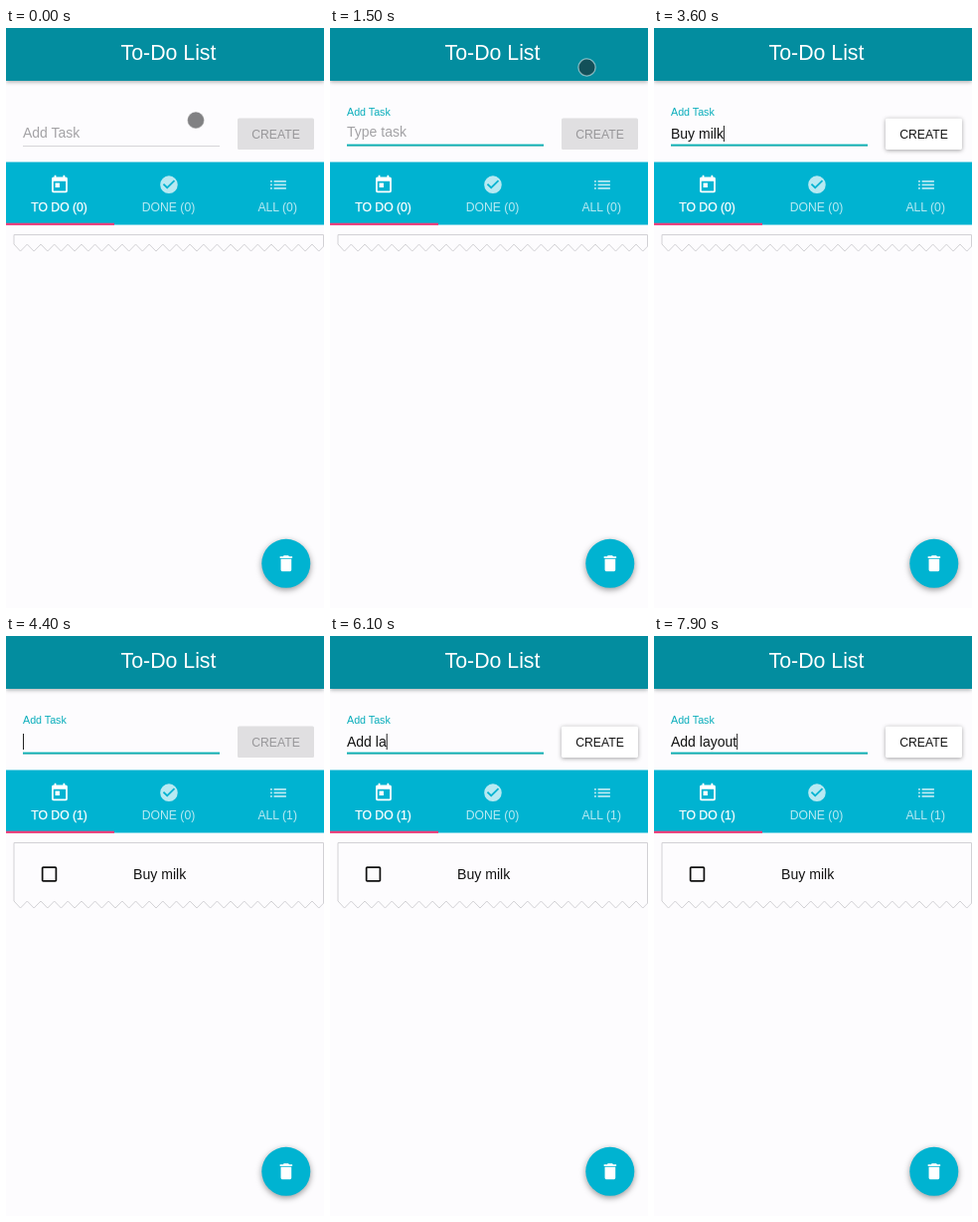
An HTML page that plays this animation: 320 px wide and 582 px high, repeating every 8 s.

```html
<!DOCTYPE html>
<html lang="en">
<head>
<meta charset="utf-8">
<title>To-Do List</title>
<style>
html, body { margin: 0; width: 100%; height: 100%; overflow: hidden; background: #fdfcfe; }
svg { display: block; width: 320px; height: 582px; font-family: "Liberation Sans", Arial, sans-serif; }
text { white-space: pre; }
.mid { text-anchor: middle; }
.caps { font-size: 12.2px; }
.body { font-size: 14px; }
.raised { filter: drop-shadow(0 1px 2px rgba(0, 0, 0, .35)); }
</style>
</head>
<body>
<svg viewBox="0 0 320 582">
  <rect width="320" height="53" fill="#038d9f" class="raised"/>
  <text x="163.5" y="32.3" class="mid" font-size="21.3" fill="#fff">To-Do List</text>

  <text id="label" x="17"></text>
  <text id="hint" x="17" y="109" class="body" fill="#a3a2a5">Type task</text>
  <text id="entry" x="17" y="111" class="body" fill="#111"></text>
  <rect id="caret" y="98" width="1" height="16" fill="#222"/>
  <rect x="17" y="118" width="198" height="1" fill="#d6d5d8"/>
  <rect id="underline" y="116.6" height="1.9" fill="#0db2b6"/>

  <rect x="233" y="90.5" width="77" height="31.5" rx="1.5" fill="#e0dfe1"/>
  <text x="271.5" y="110.5" class="mid caps" fill="#98979a">CREATE</text>
  <g id="create">
    <rect x="233" y="90.5" width="77" height="31.5" rx="1.5" fill="#fff" class="raised"/>
    <text x="271.5" y="110.5" class="mid caps" fill="#151515">CREATE</text>
  </g>

  <rect y="134.5" width="320" height="63" fill="#00b3d1"/>
  <rect y="195.7" width="109" height="2.2" fill="#f23c79"/>
  <g fill="#fff">
    <path transform="translate(43.4 146.8) scale(.88)" d="M19 3h-1V1h-2v2H8V1H6v2H5c-1.1 0-2 .9-2 2v14c0 1.1.9 2 2 2h14c1.1 0 2-.9 2-2V5c0-1.1-.9-2-2-2zm0 16H5V8h14v11zM7 10h5v5H7z"/>
    <text id="todo" x="53.6" y="183.6" class="mid caps" stroke="#fff" stroke-width=".25"></text>
    <g opacity=".72">
      <path transform="translate(153.4 146.6) scale(.88)" d="M12 2a10 10 0 1 0 0 20a10 10 0 1 0 0-20zm-2 15l-5-5 1.41-1.41L10 14.17l7.59-7.59L19 8l-9 9z"/>
      <text x="163.5" y="183.6" class="mid caps">DONE (0)</text>
      <path transform="translate(263.4 146.8) scale(.88)" d="M3 11h2v2H3zM3 15h2v2H3zM3 7h2v2H3zM7 11h14v2H7zM7 15h14v2H7zM7 7h14v2H7z"/>
      <text id="all" x="273.2" y="183.6" class="mid caps"></text>
    </g>
  </g>

  <path id="paper" fill="none" stroke="#d2d1d5"/>
  <g id="item" fill="#111">
    <path transform="translate(33.2 228.7) scale(.86)" d="M19 5v14H5V5h14m0-2H5c-1.1 0-2 .9-2 2v14c0 1.1.9 2 2 2h14c1.1 0 2-.9 2-2V5c0-1.1-.9-2-2-2z"/>
    <text x="128" y="243.7" font-size="14.1">Buy milk</text>
  </g>

  <circle cx="281.8" cy="537.3" r="24.5" fill="#00b3d1" style="filter: drop-shadow(0 2px 3px rgba(0, 0, 0, .4))"/>
  <path transform="translate(271.2 526.6) scale(.89)" fill="#fff" d="M6 19c0 1.1.9 2 2 2h8c1.1 0 2-.9 2-2V7H6v12zM19 4h-3.5l-1-1h-5l-1 1H5v2h14V4z"/>
  <circle id="pointer" r="8.6" fill="#202022" fill-opacity=".56" stroke="#fff" stroke-opacity=".5" stroke-width="1.3"/>
</svg>
<script>
const LOOP = 8000, FOCUS = 600, ENTER = 4000;
const tasks = [
  { text: "Buy milk", keys: [1800, 1950, 2150, 2450, 2700, 2850, 3050, 3300] },
  { text: "Add layout", keys: [5100, 5300, 5450, 5650, 5900, 6050, 6400, 6700, 7100, 7500] }
];
const [first, second] = tasks;
const el = id => document.getElementById(id);
const set = (id, attrs) => {
  for (const name in attrs) el(id).setAttribute(name, attrs[name]);
};
const ramp = (t, from, length) => {
  const p = Math.min(1, Math.max(0, (t - from) / length));
  return p * p * (3 - 2 * p);
};
const mix = (a, b, p) => a + (b - a) * p;

function paperPath(bottom) {
  let d = `M319.5 ${bottom - 5}V207.5H8V${bottom - 7}`;
  for (let x = 14.5; x < 320; x += 13.65) d += `L${x} ${bottom}L${x + 6.825} ${bottom - 7}`;
  return d;
}

function draw(t) {
  const focus = ramp(t, FOCUS, 300);
  const added = t >= ENTER ? 1 : 0;
  const task = tasks[added];
  const typed = task.keys.filter(k => k <= t);
  const lastInput = typed.length ? typed[typed.length - 1] : added ? ENTER : FOCUS;

  el("label").textContent = "Add Task";
  set("label", {
    y: mix(109.5, 87.7, focus),
    "font-size": mix(14, 10.7, focus),
    fill: focus > .3 ? "#08adbb" : "#a3a2a5"
  });
  set("hint", { opacity: typed.length || added ? 0 : focus });
  set("underline", { x: 116 - 99 * focus, width: 198 * focus });

  el("entry").textContent = task.text.slice(0, typed.length);
  const blinkOn = t >= FOCUS && Math.floor((t - lastInput) / 500) % 2 === 0;
  set("caret", {
    x: 17 + el("entry").getComputedTextLength(),
    opacity: blinkOn ? 1 : 0
  });

  const enabled = ramp(t, first.keys[0], 250) - ramp(t, ENTER, 250) + ramp(t, second.keys[0], 250);
  set("create", { opacity: enabled });

  el("todo").textContent = `TO DO (${added})`;
  el("all").textContent = `ALL (${added})`;
  set("paper", { d: paperPath(added ? 273 : 224) });
  set("item", { opacity: added });

  const toField = ramp(t, 0, 450), away = ramp(t, 900, 500);
  set("pointer", {
    cx: mix(mix(191, 176, toField), 258.5, away),
    cy: mix(mix(92.5, 104, toField), 39.5, away),
    opacity: t < first.keys[0] ? 1 : 0
  });
}

function tick() {
  draw(performance.now() % LOOP);
  requestAnimationFrame(tick);
}
tick();
</script>
</body>
</html>
```
